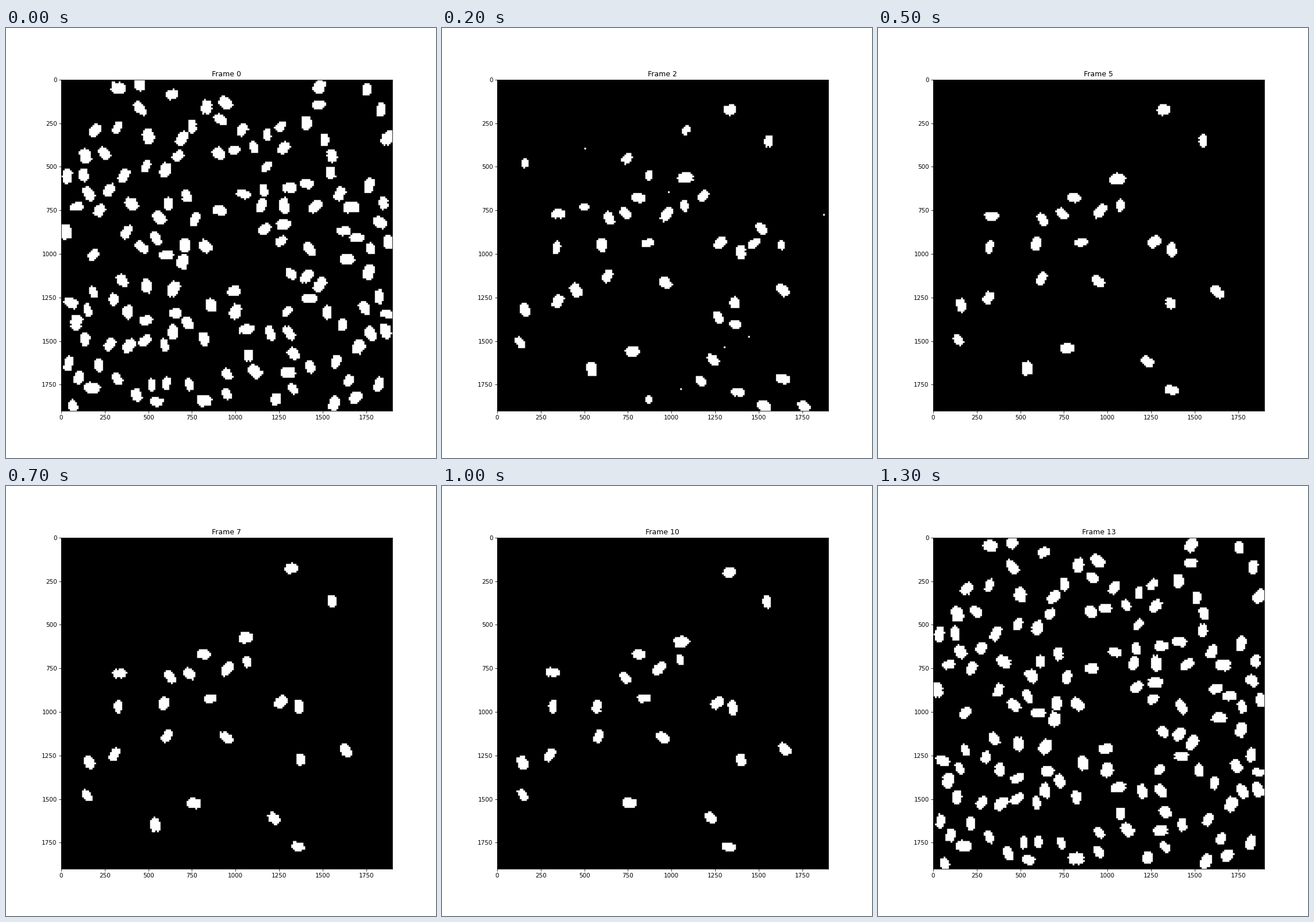
Animation of 748x748 px, one loop 1.4 s. Source, as a matplotlib script:

```python
import numpy as np
import matplotlib.pyplot as plt
from matplotlib.animation import FuncAnimation

SIZE, DPI = 748, 74.8
FRAMES, INTERVAL = 14, 100
GRID, BLOCK = 190, 10          # mask cells per side, image pixels per mask cell
LEFT, TOP, SIDE = 95.9, 89.76, 576.0

# Positions are in stage pixels, y down; a positive tilt leans like "\".
centres = (np.arange(GRID) + 0.5) * SIDE / GRID
X, Y = np.meshgrid(LEFT + centres, TOP + centres)

# Open areas of the crowded field: x, y, radius
CLEARINGS = [(412, 395, 58), (475, 112, 48), (625, 180, 40), (400, 330, 26)]

# Cells that stay through the middle of the loop, by tilt
SURVIVORS = {
    0: [(498, 144), (418, 264), (342, 294), (197, 325), (354, 371), (508, 629),
        (328, 555)],
    85: [(566, 198), (419, 306), (274, 378), (511, 386), (195, 382), (143, 483),
         (512, 477)],
    -50: [(385, 319), (480, 374), (281, 434), (192, 469)],
    42: [(319, 326), (384, 439), (139, 541), (468, 578), (592, 458)],
}
# Cells that vanish on the way: x, y, last frame
FADING = [(229, 456, 4), (285, 332, 8), (473, 501, 4), (258, 591, 8)]


def random_shape(rng, tilt):
    """Length, width and tilt of a typical cell."""
    length = rng.uniform(21, 28)
    return length, length * rng.uniform(0.6, 0.78), tilt + rng.normal(0, 8)


def scatter(rng, count, gap, taken=()):
    """Random points at least `gap` apart and outside the clearings."""
    points = list(taken)
    while len(points) < len(taken) + count:
        p = (LEFT + rng.uniform(6, SIDE - 6), TOP + rng.uniform(6, SIDE - 6))
        apart = all(np.hypot(p[0] - x, p[1] - y) > gap for x, y in points)
        clear = all(np.hypot(p[0] - x, p[1] - y) > r for x, y, r in CLEARINGS)
        if apart and clear:
            points.append(p)
    return points[len(taken):]


def make_field(rng):
    cells = []
    for p in scatter(rng, 142, 26):
        tilt = rng.choice([90, 90, 62, 42, 0, -45, -65])
        cells.append((p, random_shape(rng, tilt)))
    return cells


def make_survivors(rng):
    cells = []
    for tilt, places in SURVIVORS.items():
        for x, y in places:
            cells.append((x, y, random_shape(rng, tilt), FRAMES))
    for x, y, last in FADING:
        cells.append((x, y, random_shape(rng, 60), last))
    velocity = rng.normal((-0.4, -0.1), 0.9, (len(cells), 2))
    phase = rng.uniform(0, 2 * np.pi, (len(cells), 2))
    return list(zip(cells, velocity, phase))


def make_leftovers(rng, taken):
    """Debris and short-lived cells seen just after the field clears."""
    cells = []
    for p in scatter(rng, 42, 27, taken):
        shape = np.array(random_shape(rng, rng.choice([0, 90, 45, -45])))
        shape[:2] *= rng.choice([0.2, 0.65, 0.85, 1])
        cells.append((p, shape))
    return cells


field = make_field(np.random.default_rng(4))
survivors = make_survivors(np.random.default_rng(8))
leftovers = make_leftovers(np.random.default_rng(15),
                           [cell[:2] for cell, _, _ in survivors])


def stamp(mask, rough, x, y, shape):
    """Fill one rounded, tilted cell with a slightly uneven edge."""
    length, width, tilt = shape
    c, s = np.cos(np.radians(tilt)), np.sin(np.radians(tilt))
    u = ((X - x) * c + (Y - y) * s) / (length / 2)
    v = ((Y - y) * c - (X - x) * s) / (width / 2)
    mask |= np.abs(u) ** 2.6 + np.abs(v) ** 2.6 <= rough


def build_mask(n):
    mask = np.zeros((GRID, GRID), bool)
    rough = np.random.default_rng(n).normal(1, 0.13, mask.shape)
    if n in (0, FRAMES - 1):
        for (x, y), shape in field:
            stamp(mask, rough, x, y, shape)
        return mask

    settle = 0.3 ** (n - 1)
    for (x, y, shape, last), velocity, phase in survivors:
        if n <= last:
            dx, dy = velocity * (n - 6) + 2 * np.sin(0.7 * n + phase)
            stamp(mask, rough, x + dx + 5 * settle, y + dy + 2 * settle, shape)
    if n <= 2:
        for (x, y), shape in leftovers[::n]:
            stamp(mask, rough, x, y, shape)
    return mask


def pixels(n):
    return np.kron(build_mask(n), np.ones((BLOCK, BLOCK))).astype(np.uint8)


fig = plt.figure(figsize=(SIZE / DPI, SIZE / DPI), dpi=DPI)
ax = fig.add_axes([LEFT / SIZE, 1 - (TOP + SIDE) / SIZE, SIDE / SIZE, SIDE / SIZE])
image = ax.imshow(pixels(0), cmap="gray", vmin=0, vmax=1)
title = ax.set_title("Frame 0")


def update(n):
    image.set_data(pixels(n))
    title.set_text(f"Frame {n}")
    return image, title


animation = FuncAnimation(fig, update, frames=FRAMES, interval=INTERVAL,
                          repeat=True, repeat_delay=0)
plt.show()
```
